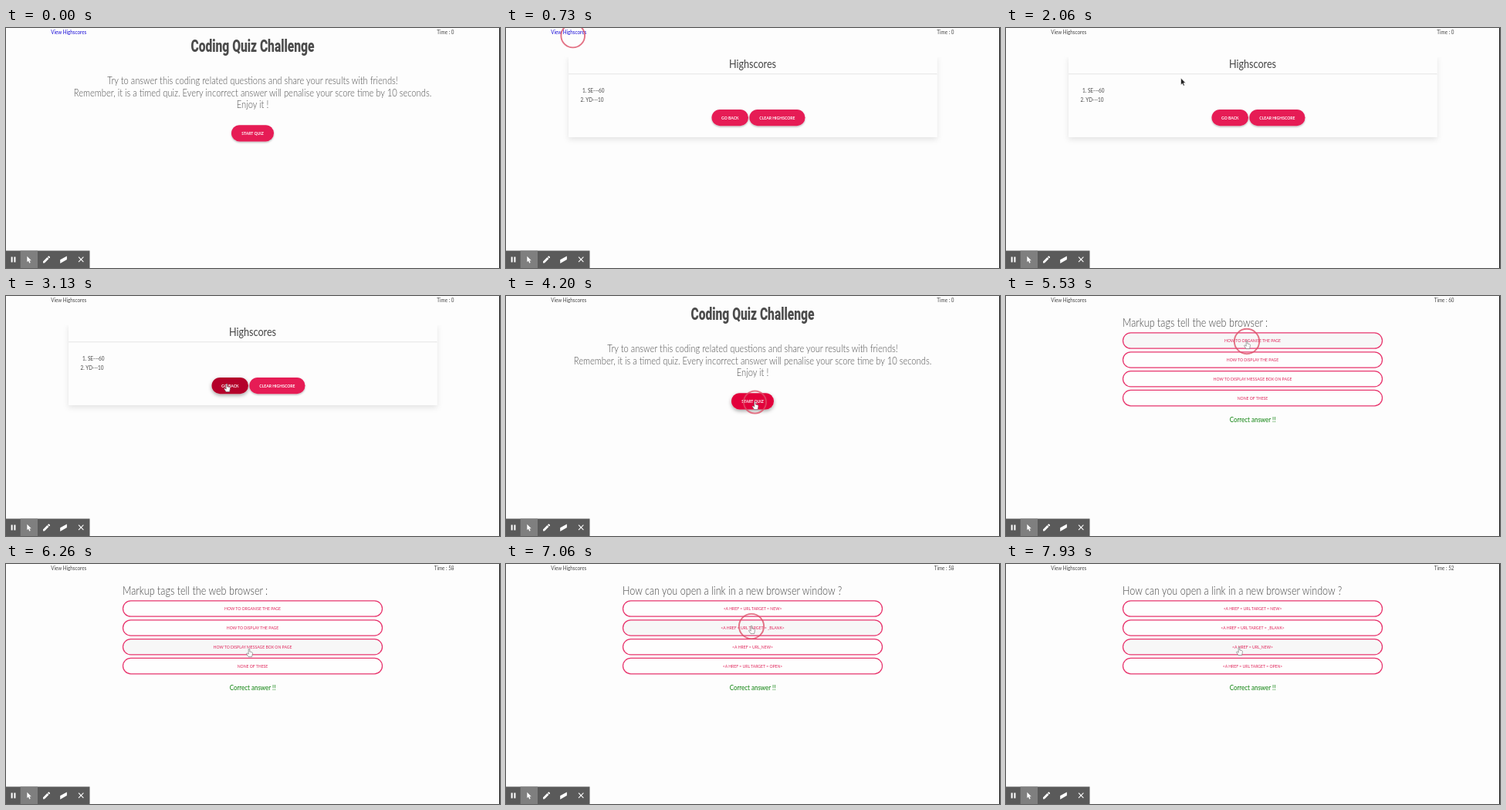
These frames come from a looping animation (640 by 312 pixels, 8000 ms). An HTML page:

```html
<!DOCTYPE html>
<html lang="en">
<head>
<meta charset="utf-8">
<title>Coding Quiz Challenge</title>
<style>
  html, body { margin: 0; width: 100%; height: 100%; overflow: hidden; background: #fdfdfd; }
  svg { display: block; width: 100%; height: 100%; }
  text { font-family: Lato, "Open Sans", sans-serif; white-space: pre; }
  .title { font-family: Roboto, "Open Sans", sans-serif; font-weight: 900; }
</style>
</head>
<body>
<svg id="stage" viewBox="0 0 640 312">
  <defs>
    <filter id="soft" x="-20%" y="-30%" width="140%" height="180%">
      <feDropShadow dx="0" dy="1.2" stdDeviation="1.3" flood-opacity=".3"/>
    </filter>
    <filter id="raised" x="-20%" y="-40%" width="140%" height="200%">
      <feDropShadow dx="0" dy="2" stdDeviation="2.4" flood-opacity=".36"/>
    </filter>
    <filter id="cardShade" x="-5%" y="-10%" width="110%" height="130%">
      <feDropShadow dx="0" dy="3" stdDeviation="3.8" flood-opacity=".1"/>
    </filter>
  </defs>
</svg>
<script>
const LOOP = 8000;
const STEP = 1000 / 15;
const NARROW = 0.798;
const TITLE_NARROW = 0.715;
const stage = document.getElementById('stage');

function el(tag, attrs, parent = stage) {
  const node = document.createElementNS('http://www.w3.org/2000/svg', tag);
  for (const key in attrs) node.setAttribute(key, attrs[key]);
  parent.appendChild(node);
  return node;
}

function label(parent, str, x, y, size, opts = {}) {
  const { fill = '#444', weight = 400, anchor = 'start', narrow = NARROW, cls = '' } = opts;
  const node = el('text', {
    transform: `translate(${x} ${y}) scale(${narrow} 1)`,
    'font-size': size, 'font-weight': weight, 'text-anchor': anchor, fill, class: cls
  }, parent);
  node.textContent = str;
  return node;
}

function pill(parent, str, x, y, w) {
  const rect = el('rect', { x, y, width: w, height: 21.2, rx: 10.6 }, parent);
  label(parent, str, x + w / 2, y + 13, 6.35, { fill: '#fff', weight: 700, anchor: 'middle' });
  return { rect, x, y, w, h: 21.2 };
}

const show = (node, on) => node.setAttribute('display', on ? 'inline' : 'none');
const setText = (node, str) => { if (node.textContent !== str) node.textContent = str; };
const inside = (b, p) => p.x >= b.x && p.x <= b.x + b.w && p.y >= b.y && p.y <= b.y + b.h;

// Header
const link = label(stage, 'View Highscores', 58.3, 8.4, 7.9);
const timer = label(stage, 'Time : 0', 580.5, 8.4, 7.9, { anchor: 'end' });

// Start page
const home = el('g', {});
label(home, 'Coding Quiz Challenge', 319.5, 31, 21.8,
  { fill: '#4c4c4c', weight: 900, anchor: 'middle', narrow: TITLE_NARROW, cls: 'title' });
[
  'Try to answer this coding related questions and share your results with friends!',
  'Remember, it is a timed quiz. Every incorrect answer will penalise your score time by 10 seconds.',
  'Enjoy it !'
].forEach((line, i) => label(home, line, 319.5, 73 + i * 15.6, 14,
  { fill: '#505050', weight: 300, anchor: 'middle' }));
const startBtn = pill(home, 'START QUIZ', 292, 126.2, 55);

// Highscores page
const scores = el('g', {});
el('rect', { x: 81, y: 36, width: 477.5, height: 106, fill: '#fdfdfd', filter: 'url(#cardShade)' }, scores);
el('rect', { x: 76, y: 28, width: 488, height: 10, fill: '#fdfdfd' }, scores);
el('rect', { x: 81, y: 59.3, width: 477.5, height: 1, fill: '#e4e4e4' }, scores);
label(scores, 'Highscores', 319.5, 52.4, 15.8, { anchor: 'middle' });
label(scores, '1. SE---60', 127.5, 83.7, 8, { anchor: 'end' });
label(scores, '2. YD---10', 126.5, 95.5, 8, { anchor: 'end' });
const backBtn = pill(scores, 'GO BACK', 266.5, 106, 47.5);
const clearBtn = pill(scores, 'CLEAR HIGHSCORE', 315.3, 106, 72.2);

// Quiz page
const quiz = el('g', {});
const question = label(quiz, '', 151, 40.3, 15.8, { fill: '#444', weight: 300 });
const options = [0, 1, 2, 3].map(i => {
  const box = { x: 151.5, y: 47.9 + i * 24.85, w: 336, h: 20.3 };
  const rect = el('rect', {
    x: box.x, y: box.y, width: box.w, height: box.h, rx: 10.15,
    stroke: '#e8356d', 'stroke-width': 1.25
  }, quiz);
  const text = label(quiz, '', 319.5, box.y + 12.5, 6.4, { fill: '#e0245a', anchor: 'middle' });
  return { ...box, rect, text };
});
const verdict = label(quiz, 'Correct answer !!', 319.5, 164.2, 10,
  { fill: '#0a800a', anchor: 'middle' });

const questions = [
  { from: 0, ask: 'What does HTML stand for ?', picks: ['HYPER TEXT MARKUP LANGUAGE',
    'HIGH TEXT MARKUP LANGUAGE', 'HYPER TABULAR MARKUP LANGUAGE', 'NONE OF THESE'] },
  { from: 5530, ask: 'Markup tags tell the web browser :', picks: ['HOW TO ORGANISE THE PAGE',
    'HOW TO DISPLAY THE PAGE', 'HOW TO DISPLAY MESSAGE BOX ON PAGE', 'NONE OF THESE'] },
  { from: 7060, ask: 'How can you open a link in a new browser window ?', picks: ['<A HREF = URL TARGET = NEW>',
    '<A HREF = URL TARGET = _BLANK>', '<A HREF = URL_NEW>', '<A HREF = URL TARGET = OPEN>'] }
];
const ticks = [[0, 0], [5260, 60], [5730, 59], [6130, 58], [7260, 55], [7330, 54], [7400, 53], [7460, 52]];
const lastFrom = (list, t, start) => list.filter(item => start(item) <= t).pop();

// Recorder toolbar
const bar = el('g', { fill: '#fff' });
el('rect', { x: 0, y: 289.5, width: 108.5, height: 22.5, fill: '#5a5a5a' }, bar);
el('rect', { x: 18.7, y: 289.5, width: 22.3, height: 22.5, fill: '#7f7f7f' }, bar);
el('path', { d: 'M6.6 297.6h2v6.8h-2zM10.4 297.6h2v6.8h-2z' }, bar);
el('path', { d: 'M27.3 296.8v7.4l1.7-1.5 1.3 3 1.4-.6-1.3-2.9h2.4z' }, bar);
el('path', { d: 'M48 305.5v-2l5.4-5.4 2 2-5.4 5.4zM54 297.5l.9-.9q.5-.4 1 0l1 1q.4.5 0 1l-.9.9z' }, bar);
el('path', { d: 'M70.2 301.2l8.7-4.6v4.3l-8.7 5.1z' }, bar);
el('path', { d: 'M94 297.6l6.4 6.6M100.4 297.6l-6.4 6.6', stroke: '#fff', 'stroke-width': 1.1 }, bar);
el('rect', { x: 639, y: 0, width: 1, height: 312, fill: '#111' });

// Pointer and click ring
const ring = el('circle', { fill: 'none', stroke: '#de5068', 'stroke-width': 1.9, opacity: 0.8 });
const arrow = el('path', { d: 'M0 0v9l2-1.8 1.4 3 1.5-.7-1.4-2.9h2.8z', fill: '#222', stroke: '#fff', 'stroke-width': .6 });
const hand = el('path', {
  d: 'M-.8 .6Q0-.5 .8 .6V4L3.5 4.6Q4.6 5 4.4 6.4L3.6 10.6H-1L-3.5 6.6Q-3 5.4-1.8 6.2L-.8 7.2Z',
  fill: '#fff', stroke: '#666', 'stroke-width': .6, 'stroke-linejoin': 'round'
});

const path = [
  [0, 88, 10], [200, 368, 138], [400, 88, 10], [1060, 88, 10], [1130, 350, 116],
  [1670, 350, 116], [1930, 88, 10], [2200, 360, 118], [2800, 360, 118], [3130, 286, 114],
  [3600, 286, 114], [3760, 300, 20], [3930, 360, 100], [4060, 322.5, 137], [4800, 322.5, 137],
  [4860, 312, 98], [5060, 312, 58], [5660, 312, 58], [6060, 315, 110], [6400, 315, 110],
  [6730, 318, 80], [7600, 318, 80], [7930, 302, 108], [LOOP, 302, 108]
];
const clicks = [[660, 850], [3190, 3250], [4190, 4390], [5390, 5590], [6930, 7130]];

function pointerAt(t) {
  const i = Math.max(1, path.findIndex(p => p[0] >= t));
  const [t0, x0, y0] = path[i - 1], [t1, x1, y1] = path[i];
  const u = Math.min(1, (t - t0) / (t1 - t0));
  const k = u * u * (3 - 2 * u);
  return { x: x0 + (x1 - x0) * k, y: y0 + (y1 - y0) * k };
}

function pageAt(t) {
  if (t >= 4380) return quiz;
  return t >= 700 && t < 3250 ? scores : home;
}

function draw(now) {
  const t = Math.floor((now % LOOP) / STEP + 0.11) * STEP;
  const p = pointerAt(t);
  const page = pageAt(t);
  [home, scores, quiz].forEach(g => show(g, g === page));

  const overLink = p.x < 105 && p.y < 14;
  link.setAttribute('fill', overLink ? '#1a0dd8' : '#444');
  setText(timer, 'Time : ' + lastFrom(ticks, t, k => k[0])[1]);

  const click = clicks.find(([a, b]) => t >= a && t < b);
  let over = false;
  for (const [btn, owner] of [[startBtn, home], [backBtn, scores], [clearBtn, scores]]) {
    const hot = owner === page && inside(btn, p);
    over = over || hot;
    btn.rect.setAttribute('fill', !hot ? '#e61a54' : click ? '#e2003b' : '#b4002a');
    btn.rect.setAttribute('filter', hot ? 'url(#raised)' : 'url(#soft)');
  }

  const q = lastFrom(questions, t, item => item.from);
  setText(question, q.ask);
  options.forEach((o, i) => {
    const hot = page === quiz && inside(o, p);
    over = over || hot;
    setText(o.text, q.picks[i]);
    o.rect.setAttribute('fill', hot ? '#f7f7f7' : '#fefefe');
  });
  show(verdict, q !== questions[0]);

  show(hand, over);
  show(arrow, !over && !overLink);
  for (const c of [hand, arrow]) c.setAttribute('transform', `translate(${p.x} ${p.y})`);

  show(ring, !!click);
  if (click) {
    const u = (t - click[0]) / (click[1] - click[0]);
    ring.setAttribute('cx', p.x - (overLink ? 1.3 : 0));
    ring.setAttribute('cy', p.y + (overLink ? 0 : 1));
    ring.setAttribute('r', 14.4 + 2.5 * u);
  }
}

const begin = performance.now();
function loop() {
  draw(performance.now() - begin);
  requestAnimationFrame(loop);
}
loop();
</script>
</body>
</html>
```
